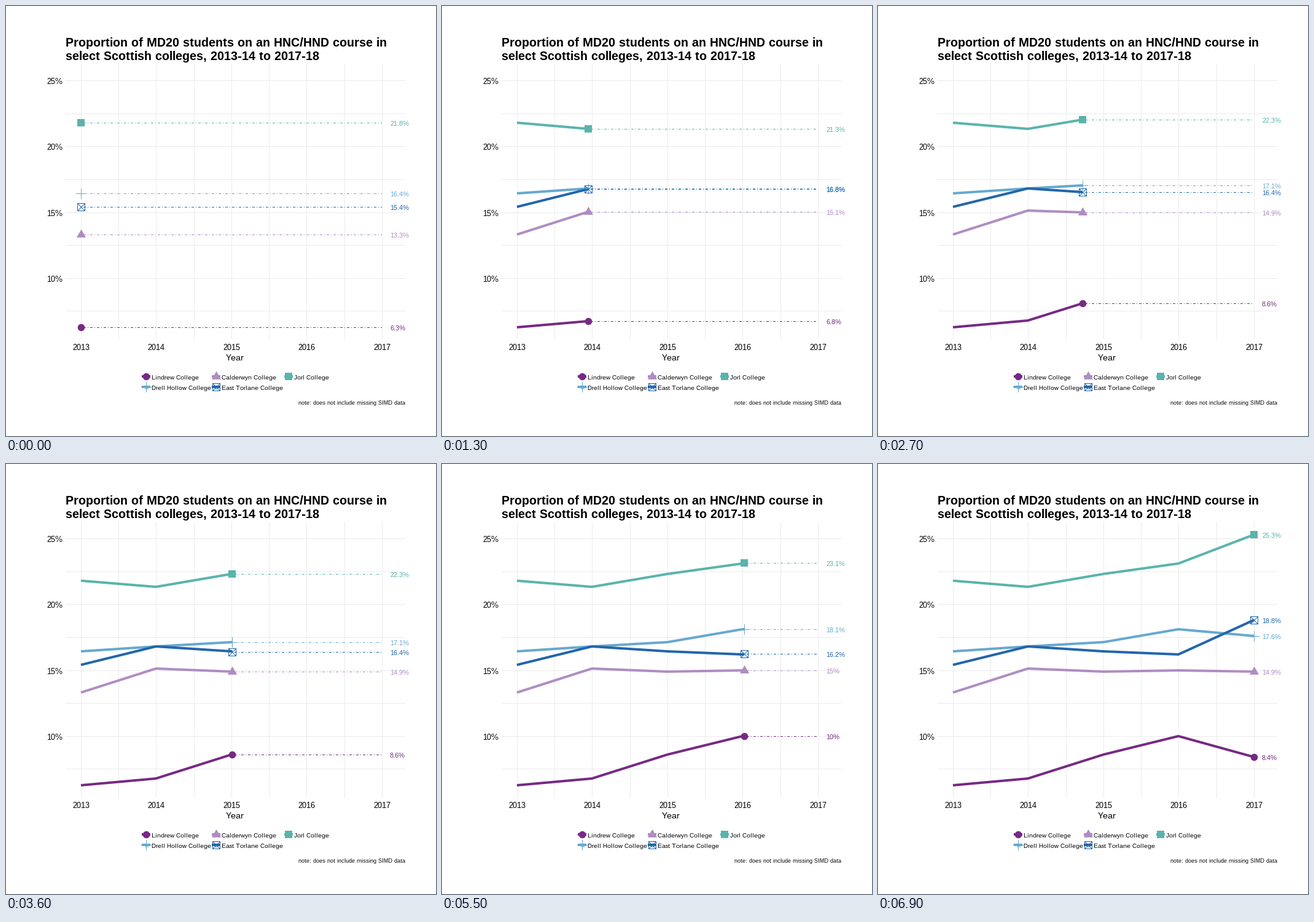
A matplotlib script for the animation above (10000 ms loop, 700 by 700 pixels).

```python
import matplotlib.pyplot as plt
import numpy as np
from matplotlib.animation import FuncAnimation
from matplotlib.patches import PathPatch
from matplotlib.path import Path

plt.rcParams.update({
    "font.family": "Liberation Sans",
    "text.hinting": "native",
    "text.hinting_factor": 1,
    "text.kerning_factor": 6,
    "path.snap": False,
})

SIZE, DPI = 700, 100
PX = 72 / DPI  # points per pixel
KEYS = [0, 17, 34, 52, 69]  # frames on which a whole year is reached
YEARS = range(2013, 2018)
GRID = "#EBEBEB"

# name, colour, marker, yearly percentages, legend key centre
SERIES = [
    ("Lindrew College", "#762A83", "circle", [6.26, 6.76, 8.6, 10, 8.4], (228, 603)),
    ("Calderwyn College", "#AF8DC3", "triangle", [13.3, 15.1, 14.9, 15, 14.9], (342, 603)),
    ("Jorl College", "#5AB4AC", "square", [21.8, 21.3, 22.3, 23.1, 25.3], (460, 603)),
    ("Drell Hollow College", "#67A9CF", "plus", [16.4, 16.8, 17.1, 18.1, 17.6], (228, 620)),
    ("East Torlane College", "#2166AC", "crossbox", [15.4, 16.8, 16.4, 16.2, 18.8], (342, 620)),
]

fig = plt.figure(figsize=(SIZE / DPI, SIZE / DPI), dpi=DPI, facecolor="white")
ax = fig.add_axes([0, 0, 1, 1])
ax.set(xlim=(0, SIZE), ylim=(SIZE, 0))
ax.axis("off")


# Data positions fall on whole pixels; the half addresses the pixel's centre.
def x_px(year):
    return np.floor(122.45 + 122.5 * (np.asarray(year) - 2013)) + 0.5


def y_px(value):
    return np.floor(443.2 - 21.44 * (np.asarray(value) - 10)) + 0.5


def text(x, y, s, size, color="black", **kw):
    return ax.text(x, y, s, fontsize=size * PX, color=color, va="baseline", **kw)


def line(xs, ys, color, width, **kw):
    kw.setdefault("solid_capstyle", "butt")
    return ax.plot(xs, ys, color=color, lw=width * PX, **kw)[0]


def strokes(*lines):
    return Path.make_compound_path(*[Path(np.array(p, float)) for p in lines])


def box(lo, hi):
    return [(lo, lo), (hi, lo), (hi, hi), (lo, hi), (lo, lo)]


def marker_path(shape):
    if shape == "circle":
        unit = Path.unit_circle()
        return Path(unit.vertices * 5.8, unit.codes)
    if shape == "triangle":
        return Path([(0, -8.8), (7.6, 4.4), (-7.6, 4.4), (0, -8.8)])
    if shape == "square":
        return Path(box(-6.5, 5.5))
    if shape == "plus":
        return strokes([(-8.5, 0), (8.5, 0)], [(0, -8.5), (0, 8.5)])
    r = 6
    return strokes(box(-r, r), [(-r, -r), (r, r)], [(-r, r), (r, -r)])


class Marker:
    def __init__(self, shape, color, x=0, y=0):
        self.base = marker_path(shape)
        if shape in ("plus", "crossbox"):
            style = dict(fc="none", ec=color, lw=PX, capstyle="butt", joinstyle="miter")
        else:
            style = dict(fc=color, ec="none", lw=0)
        self.patch = ax.add_patch(PathPatch(self.base, zorder=5, **style))
        self.move(x, y)

    def move(self, x, y):
        self.patch.set_path(Path(self.base.vertices + [x, y], self.base.codes))


def draw_static_parts():
    for x in x_px(np.arange(2013, 2017.1, 0.5)):
        line([x, x], [94, 543], GRID, 1, zorder=1)
    for y in y_px(np.arange(7.5, 25.1, 2.5)):
        line([97, 650], [y, y], GRID, 1, zorder=1)

    text(97, 66, "Proportion of MD20 students on an HNC/HND course in", 20, weight="bold")
    text(97, 88, "select Scottish colleges, 2013-14 to 2017-18", 20, weight="bold")
    for value in (10, 15, 20, 25):
        text(92, y_px(value) + 5.5, f"{value}%", 13, ha="right")
    for year in YEARS:
        text(x_px(year) - 0.5, 560, str(year), 13, ha="center")
    text(373, 577, "Year", 14, ha="center")
    text(650, 649, "note: does not include missing SIMD data", 9, ha="right")

    for name, color, shape, _, (x, y) in SERIES:
        line([x - 7, x + 7], [y, y], color, 4, zorder=3)
        Marker(shape, color, x + 0.5, y + 0.5)
        text(x + 0.5, y + 4, "a", 11, color, ha="center", zorder=6)
        text(x + 9, y + 5, name, 10)


class Trace:
    def __init__(self, color, shape, values):
        self.values = values
        self.path = line([], [], color, 4, zorder=3, solid_joinstyle="round")
        self.guide = line([], [], color, 1, zorder=4, linestyle=(0, (1, 3, 4, 3)),
                          dash_capstyle="butt")
        self.marker = Marker(shape, color)
        self.label = text(625, 0, "", 11, color, zorder=6)

    def update(self, seg, t):
        v = self.values
        now = v[seg] + (v[seg + 1] - v[seg]) * t
        x, y = x_px(2013 + seg + t), y_px(now)
        # thick strokes have an even width, so they centre on pixel edges
        self.path.set_data(np.append(x_px(YEARS[:seg + 1]), x) - 0.5,
                           np.append(y_px(v[:seg + 1]), y) - 0.5)
        self.guide.set_data([x - 0.5, x_px(2017) - 0.5], [y, y])
        self.guide.set_visible(bool(x < x_px(2017)))
        self.marker.move(x, y)
        self.label.set_y(y + 4.5)
        self.label.set_text(f"{round(v[seg + (t >= 0.5)], 1):g}%")


def cubic_in_out(p):
    return 4 * p ** 3 if p < 0.5 else 1 - 4 * (1 - p) ** 3


draw_static_parts()
traces = [Trace(color, shape, values) for _, color, shape, values, _ in SERIES]


def update(frame):
    k = min(frame, KEYS[-1])
    seg = min(int(np.searchsorted(KEYS, k, side="right")) - 1, len(KEYS) - 2)
    t = cubic_in_out((k - KEYS[seg]) / (KEYS[seg + 1] - KEYS[seg]))
    for trace in traces:
        trace.update(seg, t)
    return []


anim = FuncAnimation(fig, update, frames=100, interval=100, repeat=True, repeat_delay=0)
plt.show()
```
